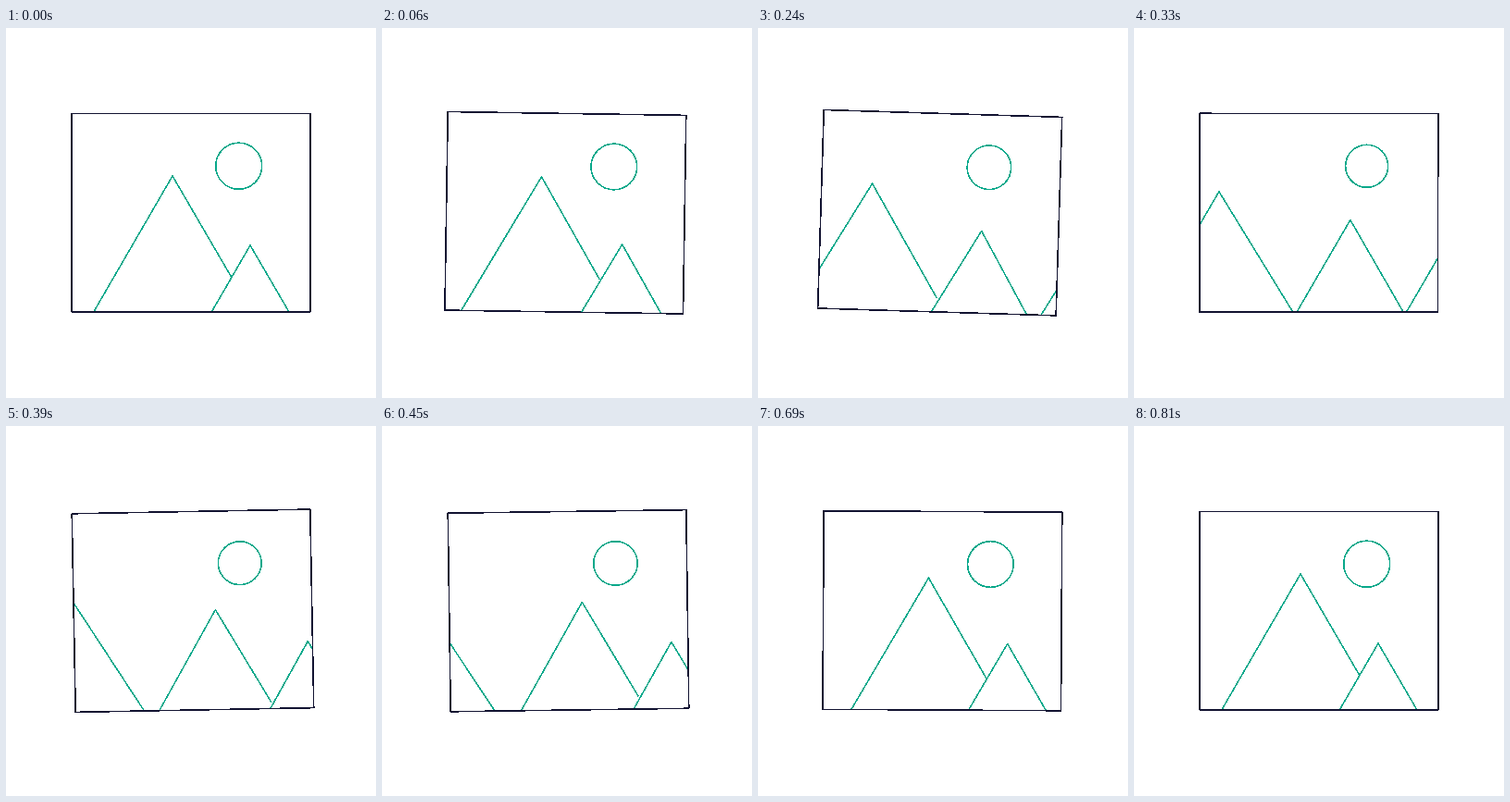
An HTML page that plays this animation: 400x400 px, repeating every 2.87 s.

```html
<!DOCTYPE html>
<html lang="en">
<head>
<meta charset="utf-8">
<title>Swinging picture</title>
<style>
  html, body { margin: 0; width: 100%; height: 100%; overflow: hidden; background: #fff; }
  svg { display: block; width: 100vw; height: 100vh; fill: none; stroke-width: 1.6; stroke-linejoin: round; }
  .scene { stroke: #08a88a; }
  .frame { stroke: #121331; }
</style>
</head>
<body>
<svg viewBox="0 0 400 400" shape-rendering="crispEdges">
  <clipPath id="inside"><rect x="71.2" y="92.45" width="257.6" height="214.6"/></clipPath>
  <g id="picture">
    <g id="range" class="scene" clip-path="url(#inside)"></g>
    <circle id="sun" class="scene" cx="251.7" cy="149.2"/>
    <rect class="frame" x="71.2" y="92.45" width="257.6" height="214.6"/>
  </g>
</svg>
<script>
const LOOP = 2870, MOVE = 810, HALF = 330, STEP = 30;
const GROUND = 307, SLOPE = 0.58;

const mix = (a, b, k) => a + (b - a) * k;
const easeOut = k => 1 - (1 - k) ** 2;
const easeInOut = k => k * k * (3 - 2 * k);
const speedUp = k => k ** 1.53;
const slowDown = k => 1.4 * k + 0.2 * k * k - 0.6 * k ** 3;

// Turning points of the swing: time, degrees, easing towards it
const swing = [
  [0, 0],
  [220, 1.85, easeOut],
  [420, -1.25, easeInOut],
  [630, 0.45, easeOut],
  [MOVE, 0, easeInOut]
];

// The path every mountain follows from right to left: peak x, y, right end x, y
const path = [
  [383, 235, 425, GROUND],
  [336.5, 235, 378.5, GROUND],
  [264, 235, 306, GROUND],
  [234, 207.5, 291.5, GROUND],
  [180, 160, 243.5, 269],
  [92, 177, 172, GROUND],
  [-36, 227, 22, GROUND]
];

const picture = document.getElementById('picture');
const sun = document.getElementById('sun');
const range = document.getElementById('range');

// Each mountain starts where the one ahead of it ends
const mountains = [0, 2, 4].map(start => {
  const line = document.createElementNS('http://www.w3.org/2000/svg', 'polyline');
  range.append(line);
  return { start, line };
});

function angleAt(t) {
  const i = Math.max(1, swing.findIndex(([time]) => time >= t));
  const [t0, from] = swing[i - 1], [t1, to, ease] = swing[i];
  return mix(from, to, ease((t - t0) / (t1 - t0)));
}

function outline(position) {
  const i = Math.min(Math.floor(position), path.length - 2);
  const [x, y, endX, endY] = path[i].map((v, j) => mix(v, path[i + 1][j], position - i));
  return [x - SLOPE * (GROUND - y), GROUND, x, y, endX, endY].join(' ');
}

function draw(time) {
  const t = Math.min(Math.floor(time % LOOP / STEP) * STEP, MOVE);
  const progress = t < HALF ? speedUp(t / HALF) : 1 + slowDown((t - HALF) / (MOVE - HALF));
  picture.setAttribute('transform', `rotate(${angleAt(t)} 200 92.45)`);
  sun.setAttribute('r', 23 + 2 * Math.abs(1 - progress));
  for (const { start, line } of mountains) line.setAttribute('points', outline(start + progress));
}

function tick() {
  draw(performance.now());
  requestAnimationFrame(tick);
}
tick();
</script>
</body>
</html>
```
